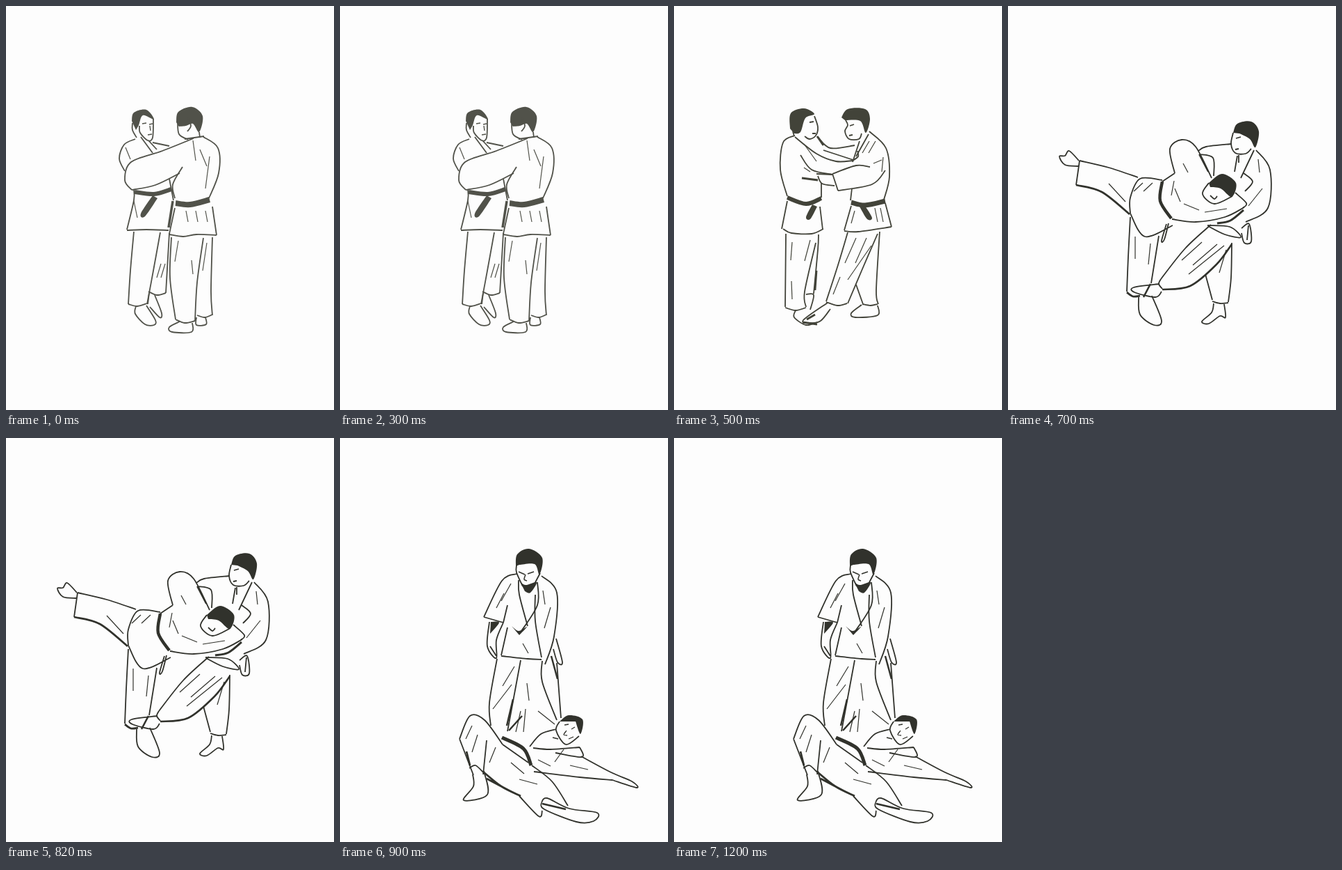
Recreate the animation shown at these times as an HTML page with a canvas. Size 472 px wide and 580 px high, loop 1.4 s.

```html
<!DOCTYPE html>
<html lang="en">
<head>
<meta charset="utf-8">
<title>Judo throw</title>
<style>
  html, body { margin: 0; width: 100%; height: 100%; overflow: hidden; background: #fdfdfd; }
  canvas { display: block; }
</style>
</head>
<body>
<canvas id="stage" width="472" height="580"></canvas>
<script>
const ctx = document.getElementById('stage').getContext('2d');

// Smooth Catmull-Rom curves; "/" separates strokes
function curves(strokes) {
  ctx.beginPath();
  for (const stroke of strokes.split('/')) {
    const pts = stroke.trim().split(/\s+/).map(p => p.split(',').map(Number));
    const at = i => pts[Math.max(0, Math.min(pts.length - 1, i))];
    ctx.moveTo(...pts[0]);
    for (let i = 1; i < pts.length; i++) {
      const [a, b, c, d] = [at(i - 2), at(i - 1), at(i), at(i + 1)];
      ctx.bezierCurveTo(b[0] + (c[0] - a[0]) / 6, b[1] + (c[1] - a[1]) / 6,
        c[0] - (d[0] - b[0]) / 6, c[1] - (d[1] - b[1]) / 6, ...c);
    }
  }
}

function line(strokes, width = 1.8) {
  curves(strokes);
  ctx.lineWidth = width;
  ctx.stroke();
}

function solid(strokes) {
  curves(strokes);
  ctx.fill();
}

// Parallel cloth creases
function creases(x, y, dx, dy, count = 1, gap = 8) {
  ctx.beginPath();
  for (let i = 0; i < count; i++) {
    ctx.moveTo(x + i * gap, y);
    ctx.lineTo(x + i * gap + dx, y + dy);
  }
  ctx.lineWidth = 1.2;
  ctx.stroke();
}

function grip() {
  // left man
  solid('181,165 184,153 202,149 213,163 197,157 191,171 187,178');
  line('182,168 182,178 188,189 / 192,172 193,182 204,193 211,189 212,162');
  line('196,169 202,168 / 206,170 211,169 / 207,172 208,179 / 204,185 210,184', 1.4);
  line('186,191 170,199 163,219 171,237 / 194,188 211,211 / 211,196 235,201 / 205,193 217,206');
  line('184,264 184,279 174,321 / 174,322 202,321 234,322');
  line('185,267 213,270 238,263', 6);
  solid('211,272 194,298 200,302 218,276');
  line('184,324 179,380 176,428 / 176,428 189,431 203,427 / 203,428 212,380 222,325');
  line('235,326 230,412 / 205,410 217,415 230,412');
  line('187,431 186,442 200,457 213,458 215,451 202,430 / 206,412 204,428 / 207,432 221,447 224,441 214,415');
  creases(172, 203, 7, 17);
  creases(184, 280, 5, 24);
  creases(223, 370, -6, 20, 2, 6);
  // right man
  solid('245,167 248,152 268,145 283,158 278,181 269,169 259,172 249,173');
  line('247,167 249,184 262,192 / 278,181 279,189 / 262,160 266,172 261,180');
  line('257,191 285,187 / 270,190 225,208 180,224 171,250 181,264 / 181,264 215,257 250,240');
  line('284,188 305,204 306,240 292,276 / 254,231 240,256 243,276 / 235,248 241,279');
  line('244,283 265,285 293,278', 8);
  line('240,280 234,318', 3.5);
  line('243,290 235,327 / 235,328 255,331 274,328 303,329 / 297,288 303,329');
  line('238,332 236,390 244,450 / 244,450 257,455 272,452 / 272,452 275,397 284,333');
  line('297,332 295,410 297,444 / 275,444 286,447 297,443');
  line('250,453 235,461 239,468 267,468 268,455 / 274,447 274,458 288,457 287,447');
  creases(279, 206, 10, 24);
  creases(293, 216, -6, 46);
  creases(269, 193, 4, 29);
  creases(259, 294, 3, 16, 3, 14);
  creases(248, 337, -5, 30);
  creases(267, 365, 2, 20);
  creases(289, 340, -6, 40);
}

function step() {
  // left man
  solid('167,176 168,154 187,147 202,155 189,161 182,181 173,183');
  line('202,158 207,174 204,186 195,191 188,187 / 171,180 173,187 / 195,167 201,166 / 199,183 204,183');
  line('174,186 157,196 153,235 163,273 / 174,188 205,212 233,223 257,222 / 182,214 198,235 228,242');
  line('207,188 225,204 260,200 / 215,207 258,221 / 257,222 265,216 264,208');
  line('206,187 215,200 / 184,247 207,250', 3);
  line('212,254 212,275 / 163,280 155,320 / 157,320 169,326 198,327 215,320 / 210,288 214,321');
  line('163,275 190,284 212,276', 6);
  solid('199,285 190,303 196,306 206,288');
  line('161,327 160,432 / 160,433 175,437 190,433 / 208,328 207,350 201,413');
  line('190,432 188,410 204,340 / 190,414 201,415 196,436');
  line('175,437 173,447 190,458 206,454');
  line('205,380 203,408 / 203,443 191,450 / 185,454 206,457', 2.8);
  creases(187, 198, 18, 25);
  creases(187, 232, 9, 6);
  creases(170, 339, -2, 26);
  creases(196, 336, -8, 30);
  creases(169, 395, 1, 26);
  // right man
  solid('241,160 250,148 275,148 282,162 276,182 268,165 246,164');
  line('247,164 250,171 246,180 252,191 266,191 270,183 / 253,172 259,170 / 252,186 257,185');
  line('281,180 305,204 310,245 302,278 / 267,194 257,224 / 280,184 262,216');
  line('228,241 262,229 282,231 / 228,241 236,265 / 236,265 285,256 304,236');
  line('205,241 228,242 / 207,244 213,255 231,258 / 256,262 254,279');
  line('255,282 275,286 304,280', 7);
  solid('267,288 278,306 285,304 275,287');
  line('255,287 245,322 / 245,323 265,324 313,317 / 304,283 313,317');
  line('250,325 235,375 219,424 / 219,425 235,430 249,427 / 250,427 270,380 293,327');
  line('296,324 291,408 294,428 / 262,400 272,428 / 271,428 283,430 293,428');
  line('270,429 255,441 261,447 293,444 293,430 / 221,426 186,451 196,455 211,452 225,435');
  creases(281, 194, -10, 17, 2, 9);
  creases(287, 226, 12, -5);
  creases(301, 217, -2, 21);
  creases(289, 290, 4, 20, 2);
  creases(260, 294, -5, 18);
  creases(262, 333, -16, 36, 2, 15);
  creases(284, 344, -34, 49);
  creases(239, 389, -10, 25);
}

function sweep() {
  // bent man
  solid('289,254 308,241 328,254 322,274 306,262 291,260');
  line('289,254 280,270 297,284 323,273 / 291,272 297,277 301,273');
  line('240,240 233,205 250,192 270,202 293,247 / 240,240 222,252 / 327,268 343,283 338,290');
  line('236,306 270,310 312,303 340,289');
  line('222,252 219,280 235,305', 4.5);
  line('301,312 320,308 339,293', 3);
  line('222,250 190,248 176,275 176,298 / 176,298 197,331 237,315 / 231,312 225,335 221,337 228,313');
  line('103,222 145,232 187,246 / 103,222 98,257');
  line('98,257 135,267 175,299', 2.8);
  line('102,222 88,208 82,215 74,216 82,228 101,230');
  line('176,303 173,360 171,410 / 217,330 206,398');
  line('171,411 180,417 190,416', 2.8);
  line('188,418 190,443 210,458 221,452 207,416');
  creases(252, 226, 7, 13);
  creases(239, 251, -4, 21);
  creases(240, 262, 8, 19);
  creases(253, 284, 22, 9);
  creases(283, 296, 32, -5);
  creases(208, 254, -13, 12, 2, -14);
  creases(145, 255, 24, 26);
  creases(183, 331, 0, 32);
  creases(205, 341, -3, 30);
  // upright man
  solid('324,182 330,169 350,166 361,180 356,203 348,191 333,183');
  line('324,182 321,198 327,211 342,212 350,205 / 328,190 335,188 / 327,206 332,205');
  line('332,214 332,225 / 357,207 377,235 374,290 342,310 / 354,207 335,247 / 330,215 326,238');
  line('339,240 352,252 341,266 / 322,198 285,202 274,208 / 275,213 295,218 296,244 / 275,213 288,238');
  line('287,315 319,317 335,332 312,328 288,316 / 336,319 347,313 350,338 340,340 336,326 / 346,315 344,336');
  line('292,314 255,348 220,392 / 220,392 217,399 222,406');
  line('222,407 262,402 300,371 322,342 / 205,399 195,418', 2.6);
  line('218,399 181,404 182,411 212,418 221,410');
  line('322,340 321,390 317,425 / 284,385 294,422 / 294,424 305,427 317,426');
  line('296,427 293,440 279,453 289,456 305,445 313,447 311,428');
  creases(360, 220, 2, 19);
  creases(366, 262, -20, 25);
  creases(279, 339, -29, 26);
  creases(301, 342, -35, 30);
  creases(311, 344, -51, 41);
  creases(314, 350, -10, 33);
}

function fall() {
  // standing man
  solid('253,184 255,167 272,159 291,172 287,196 280,181 258,182');
  line('254,183 254,193 263,213 / 288,194 279,211');
  solid('259,206 267,211 283,207 274,222 266,220');
  line('257,192 266,196 / 270,195 279,192 / 267,196 265,203 269,205', 1.5);
  line('254,195 233,205 207,257 / 207,257 235,265 / 241,240 235,265');
  solid('217,264 229,265 216,281');
  line('215,264 212,299 225,316 225,290 235,265 / 216,299 225,313');
  line('257,204 258,225 270,270 / 284,207 284,240 259,280');
  solid('247,270 257,277 269,271 258,283');
  line('290,198 312,222 308,285 295,325 / 281,225 281,263 290,315');
  line('241,272 232,312 / 232,313 270,317 290,318 / 311,288 320,322 313,322 307,303');
  line('226,317 215,380 217,413 / 260,319 241,421 / 291,320 291,350 312,405 / 312,323 318,402');
  line('262,399 243,420 / 304,313 313,346 / 249,375 240,413', 2.5);
  creases(246, 209, -14, 25);
  creases(236, 223, -11, 21);
  creases(292, 219, 3, 20);
  creases(303, 243, -9, 30);
  creases(263, 295, 8, 14);
  creases(251, 328, -17, 28);
  creases(247, 354, -27, 35);
  creases(269, 352, 3, 25);
  creases(260, 392, -7, 30);
  creases(267, 389, -3, 33);
  creases(285, 392, 24, 19);
  // fallen man
  solid('316,407 329,398 349,404 346,425 339,407');
  line('316,407 311,420 325,440 344,428 / 311,418 289,425 273,443 / 314,432 306,430');
  line('323,412 329,411 / 333,418 338,415 / 326,420 322,426 327,427 / 329,432 336,429', 1.3);
  line('278,445 303,447 345,444 / 345,444 348,458 310,452');
  line('347,457 390,480 420,493 427,502 392,491 / 392,491 345,487 279,479');
  line('233,430 264,446 275,470', 5);
  line('172,432 187,399 208,405 234,440 / 172,432 192,484 / 211,434 206,483 / 186,474 195,470 206,480');
  line('191,483 192,500 178,520 212,512 207,478 / 234,440 271,466');
  line('207,480 232,500 260,514 / 182,450 187,470 / 211,489 247,508 / 291,525 325,533', 2.8);
  line('276,470 305,493 328,528 / 258,514 286,543 291,535');
  line('290,523 298,517 330,532 370,538 365,550 340,551 294,533 290,523');
  creases(190, 413, -9, 19);
  creases(198, 426, -8, 25);
  creases(224, 444, -9, 22);
  creases(246, 466, 19, 16);
  creases(258, 490, 26, 7);
  creases(285, 462, 18, 9);
  creases(322, 447, -13, 18);
  creases(331, 470, 26, 6);
}

const LOOP = 1400;
const poses = [
  { start: 0, ink: '#51524a', draw: grip },
  { start: 500, ink: '#424339', draw: step },
  { start: 700, ink: '#31322c', draw: sweep },
  { start: 900, ink: '#31322c', draw: fall }
];

const origin = performance.now();
function tick() {
  const t = (performance.now() - origin) % LOOP;
  const pose = poses.findLast(p => t >= p.start);
  ctx.fillStyle = '#fdfdfd';
  ctx.fillRect(0, 0, 472, 580);
  ctx.fillStyle = ctx.strokeStyle = pose.ink;
  pose.draw();
  requestAnimationFrame(tick);
}
tick();
</script>
</body>
</html>
```
